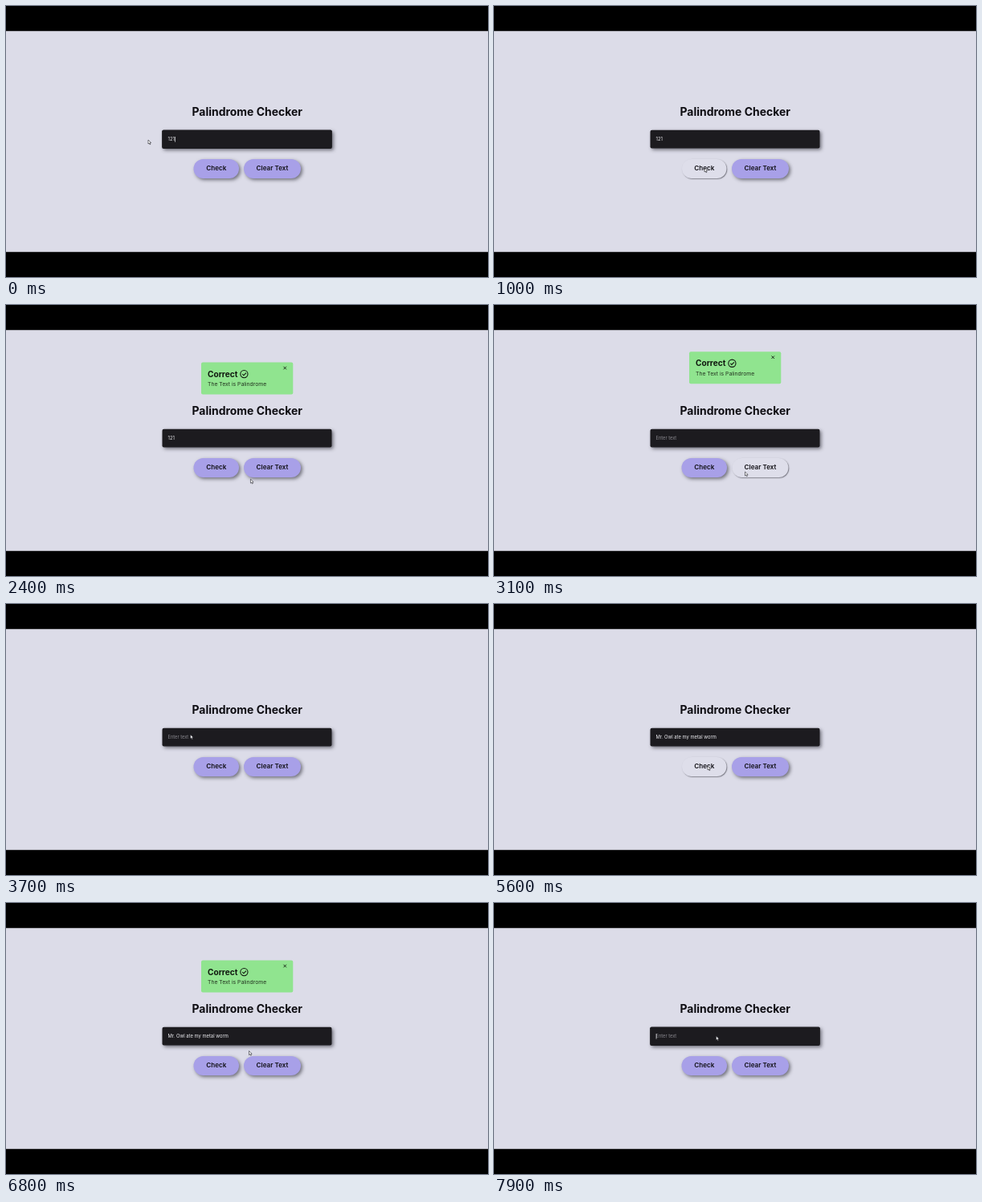
An HTML page with a canvas for the animation above (8000 ms loop, 600 by 338 pixels).

```html
<!DOCTYPE html>
<html lang="en">
<head>
<meta charset="utf-8">
<title>Palindrome Checker</title>
<style>
html, body { margin: 0; width: 100%; height: 100%; overflow: hidden; background: #000; }
canvas { display: block; width: 600px; height: 338px; }
</style>
</head>
<body>
<canvas id="stage" width="600" height="338"></canvas>
<script>
const ctx = document.getElementById('stage').getContext('2d');
const LOOP = 8000, STEP = 100, SLIDE = 800;
const FONT = 'Inter, "Open Sans", sans-serif';
const PHRASE = 'Mr. Owl ate my metal worm';
const CHECK = { x: 233.5, y: 191, w: 56.5, h: 24, label: 'Check' };
const CLEAR = { x: 296, y: 191, w: 71, h: 24, label: 'Clear Text' };

// moments of the user's actions
const CHECK_1 = 1000, CLEAR_1 = 3000, FOCUS_1 = 3800, TYPE = 4100, TYPED = 5100;
const CHECK_2 = 5600, CLEAR_2 = 7150, FOCUS_2 = 7750;

// where the pointer rests; sag bends the way there downwards
const RESTS = [
  { at: 0, leave: 300, x: 177, y: 167 },
  { at: 800, leave: CHECK_1, x: 262, y: 202 },
  { at: 1800, leave: 1800, x: 108.5, y: 237 },
  { at: 2600, leave: 3100, x: 312.5, y: 208, sag: 65 },
  { at: 3700, leave: 4600, x: 229.5, y: 163 },
  { at: 5300, leave: CHECK_2, x: 266, y: 202, sag: 68 },
  { at: 6200, leave: 6450, x: 291, y: 271 },
  { at: 6650, leave: 6800, x: 302.5, y: 184.5 },
  { at: 7050, leave: 7250, x: 320, y: 203 },
  { at: 7700, leave: LOOP, x: 276.5, y: 166 }
];

const clamp = v => Math.min(1, Math.max(0, v));
const mix = (a, b, k) => a + (b - a) * k;

// CSS "ease" curve
function ease(p) {
  let lo = 0, hi = 1;
  for (let i = 0; i < 20; i++) {
    const s = (lo + hi) / 2, r = 1 - s;
    const x = 0.75 * r * r * s + 0.75 * r * s * s + s * s * s;
    if (x < p) lo = s; else hi = s;
  }
  const s = lo, r = 1 - s;
  return 0.3 * r * r * s + 3 * r * s * s + s * s * s;
}

function pointer(t) {
  const i = RESTS.findLastIndex(r => r.at <= Math.max(0, t));
  const from = RESTS[i], to = RESTS[i + 1];
  if (!to || t <= from.leave) return [from.x, from.y];
  const k = ease((t - from.leave) / (to.at - from.leave));
  const dip = (to.sag || 0) * Math.sin(Math.PI * k);
  return [mix(from.x, to.x, k), mix(from.y, to.y, k) + dip];
}

// share of the last moments spent over a button
function hover(b, t) {
  let hits = 0;
  for (let i = 0; i < 5; i++) {
    const [x, y] = pointer(t - i * 35);
    if (x > b.x && x < b.x + b.w && y > b.y && y < b.y + b.h) hits++;
  }
  return hits / 5;
}

function bannerTop(t) {
  const slide = click => ease(clamp((t - click) / SLIDE));
  const shown = slide(CHECK_1) - slide(CLEAR_1) + slide(CHECK_2) - slide(CLEAR_2);
  return mix(-26, 71.5, shown);
}

function fieldText(t) {
  if (t < CLEAR_1) return '121';
  if (t >= CLEAR_2) return '';
  return PHRASE.slice(0, Math.floor(clamp((t - TYPE) / (TYPED - TYPE)) * PHRASE.length));
}

const focused = t => t < CHECK_1 || (t >= FOCUS_1 && t < CHECK_2) || t >= FOCUS_2;

function caretOn(t) {
  if (t >= TYPE && t < TYPED) return true;
  const since = [FOCUS_2, TYPED, FOCUS_1, 0].find(s => s <= t);
  return focused(t) && (t - since) % 1000 < 500;
}

function text(str, x, y, weight, size, color, align = 'left') {
  ctx.font = `${weight} ${size}px ${FONT}`;
  ctx.textAlign = align;
  ctx.fillStyle = color;
  ctx.fillText(str, x, y);
  return ctx.measureText(str).width;
}

function box(x, y, w, h, r, color, offset = 0, blur = 0) {
  ctx.save();
  ctx.shadowColor = 'rgba(45,45,55,.62)';
  ctx.shadowOffsetX = ctx.shadowOffsetY = offset;
  ctx.shadowBlur = blur;
  ctx.fillStyle = color;
  ctx.beginPath();
  ctx.roundRect(x, y, w, h, r);
  ctx.fill();
  ctx.restore();
}

function line(width, color, ...points) {
  ctx.beginPath();
  points.forEach(([x, y]) => ctx.lineTo(x, y));
  ctx.lineWidth = width;
  ctx.strokeStyle = color;
  ctx.stroke();
}

function button(b, t) {
  const k = hover(b, t);
  const color = `rgb(${mix(168, 222, k)},${mix(160, 222, k)},${mix(232, 234, k)})`;
  box(b.x + k / 2, b.y, b.w - k, b.h, 12, color, mix(2, 0.8, k), mix(4, 1.2, k));
  text(b.label, b.x + b.w / 2, 205.4, 600, 8.1, '#111016', 'center');
}

function field(t) {
  const grow = focused(t) ? 0.4 : 0;
  box(194.5 - grow, 154.8 - grow, 211 + 2 * grow, 22.7 + 2 * grow, 2, '#1c1b1f', 2, 4);
  const value = fieldText(t);
  let w = 0;
  if (value) w = text(value, 201.5, 168.2, 400, 5.85, '#eeeef2');
  else text('Enter text', 201.5, 168.2, 400, 5.7, '#8b8a90');
  if (caretOn(t)) {
    ctx.fillStyle = '#e8e8ec';
    ctx.fillRect(201.7 + w, 163, 0.7, 6.6);
  }
}

function banner(y) {
  const ink = '#10180f';
  ctx.save();
  ctx.translate(243, y);
  box(0, 0, 114.3, 40, 2, '#90e48f');
  text('Correct', 8, 18.3, 700, 10.1, ink);
  ctx.beginPath();
  ctx.arc(53.4, 14.6, 4.6, 0, Math.PI * 2);
  ctx.lineWidth = 1.1;
  ctx.strokeStyle = ink;
  ctx.stroke();
  line(1.1, ink, [51.3, 14.7], [52.9, 16.3], [55.9, 13.1]);
  text('The Text is Palindrome', 8, 29.5, 400, 6.8, '#22331f');
  line(0.9, ink, [102.5, 5.3], [106, 8.8]);
  line(0.9, ink, [106, 5.3], [102.5, 8.8]);
  ctx.restore();
}

function arrow([x, y]) {
  ctx.save();
  ctx.translate(x, y);
  ctx.fillStyle = '#fff';
  ctx.lineWidth = 0.6;
  ctx.strokeStyle = '#26252c';
  const shape = new Path2D('M0 0V5L1.2 4 2 5.8 2.9 5.4 2.1 3.7 3.7 3.6Z');
  ctx.fill(shape);
  ctx.stroke(shape);
  ctx.restore();
}

function draw(t) {
  ctx.fillStyle = '#000';
  ctx.fillRect(0, 0, 600, 338);
  ctx.save();
  ctx.beginPath();
  ctx.rect(0, 31.15, 600, 275.7);
  ctx.clip();
  ctx.fillStyle = '#dcdce8';
  ctx.fillRect(0, 31, 600, 276);
  text('Palindrome Checker', 300.2, 136.5, 700, 13.95, '#0e0d12', 'center');
  field(t);
  button(CHECK, t);
  button(CLEAR, t);
  banner(bannerTop(t));
  arrow(pointer(t));
  ctx.restore();
}

const start = performance.now();
function tick() {
  const t = (performance.now() - start) % LOOP;
  draw(Math.floor(t / STEP) * STEP);
  requestAnimationFrame(tick);
}
tick();
</script>
</body>
</html>
```
